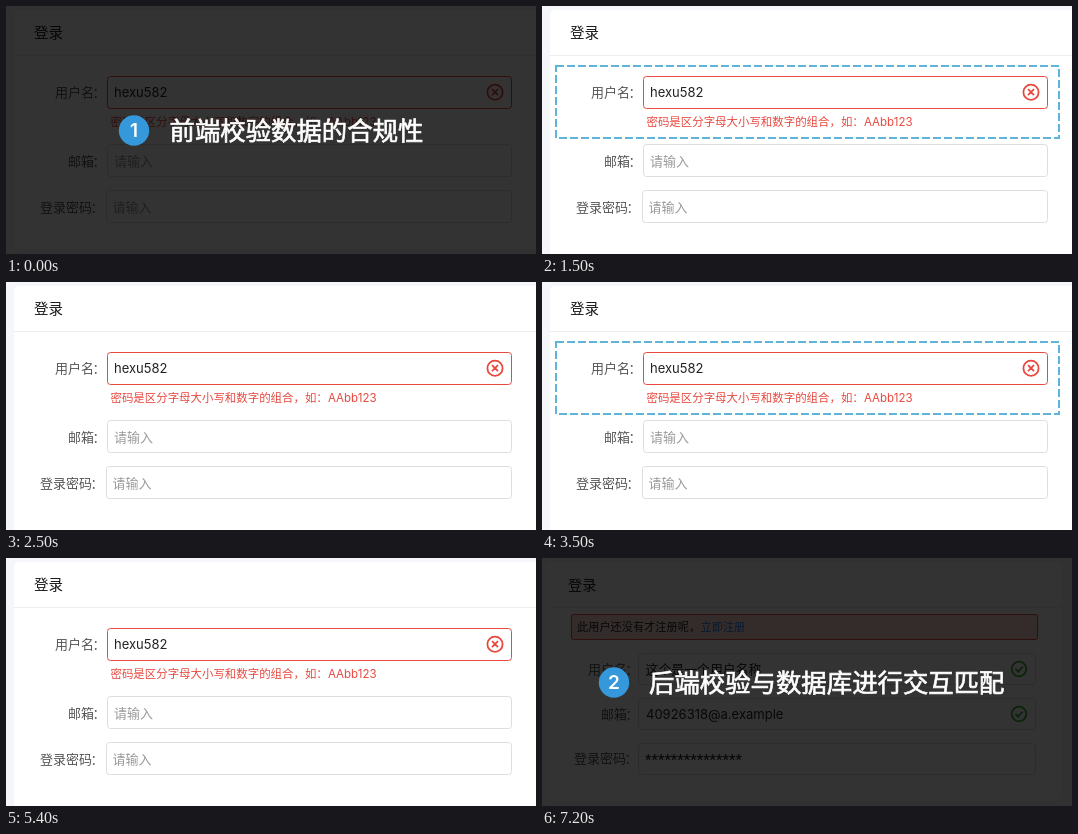
Animation, 530 px wide and 248 px high, one loop 8 s. Source, as an HTML page with a canvas:

```html
<!DOCTYPE html>
<html lang="zh-CN">
<head>
<meta charset="utf-8">
<title>表单校验</title>
<style>
html, body { margin: 0; width: 100%; height: 100%; overflow: hidden; background: #fff; }
canvas { display: block; width: 530px; height: 248px; }
</style>
</head>
<body>
<canvas id="stage"></canvas>
<script>
const W = 530, H = 248, LOOP = 8000;
const canvas = document.getElementById('stage');
const ctx = canvas.getContext('2d');
const scale = Math.max(1, window.devicePixelRatio || 1);
canvas.width = W * scale;
canvas.height = H * scale;

const CJK = '"Noto Sans CJK SC", "Noto Sans CJK", sans-serif';
const LATIN = 'Inter, sans-serif';
const MONO_STARS = 'Roboto, sans-serif';

const color = {
  page: '#f5f6fa', card: '#fff', rule: '#ededed', border: '#dedede',
  title: '#1c1c1c', label: '#555', value: '#222', hint: '#9a9a9a',
  red: '#e8493f', green: '#3cb034', blue: '#1f7fe8', alert: '#ffdcda'
};

// cy is the vertical centre of the glyphs
function text(str, x, cy, size, fill, family = CJK, weight = 400) {
  ctx.font = `${weight} ${size}px ${family}`;
  ctx.fillStyle = fill;
  ctx.fillText(str, x, cy + size * 0.37);
}

function box(x, y, w, h, stroke, fill, r = 3) {
  ctx.beginPath();
  ctx.roundRect(x + 0.5, y + 0.5, w, h, r);
  if (fill) { ctx.fillStyle = fill; ctx.fill(); }
  ctx.strokeStyle = stroke;
  ctx.lineWidth = 1;
  ctx.stroke();
}

function ring(x, y, r, stroke, marks) {
  ctx.strokeStyle = stroke;
  ctx.lineWidth = 1.8;
  ctx.beginPath();
  ctx.arc(x, y, r, 0, Math.PI * 2);
  for (const line of marks) {
    line.forEach(([dx, dy], i) => ctx[i ? 'lineTo' : 'moveTo'](x + dx, y + dy));
  }
  ctx.stroke();
}

const cross = (x, y) =>
  ring(x, y, 7.6, color.red, [[[-3, -3], [3, 3]], [[3, -3], [-3, 3]]]);
const check = (x, y) =>
  ring(x, y, 7.3, color.green, [[[-3.5, 0], [-0.8, 2.7], [3.7, -2.3]]]);

function panel(x, y, right, bottom) {
  ctx.fillStyle = color.page;
  ctx.fillRect(0, 0, W, H);
  ctx.fillStyle = color.card;
  ctx.beginPath();
  ctx.roundRect(x, y, right - x, bottom - y, 5);
  ctx.fill();
  ctx.fillStyle = color.rule;
  ctx.fillRect(x, 49, right - x, 1);
}

function labels(xs, rows) {
  ['用户名', '邮箱', '登录密码'].forEach((name, i) => {
    text(name, xs[i], rows[i], 13, color.label);
    text('：', xs[i] + 13 * name.length - 1.5, rows[i], 13, color.label);
  });
}

function invalidForm(bottom) {
  panel(8, 4, W + 10, bottom);
  text('登录', 28, 27, 14.5, color.title);
  labels([49, 62, 34], [86, 155, 201]);
  box(101, 70, 404, 32, color.red);
  box(101, 138, 404, 32, color.border);
  box(100, 184, 405, 32, color.border);
  text('hexu582', 108, 86, 13, color.value, LATIN);
  cross(489, 86.2);
  text('密码是区分字母大小写和数字的组合，如：', 104.5, 116, 11.45, color.red);
  text('AAbb123', 322, 116, 11.5, color.red, LATIN);
  text('请输入', 108, 155, 13, color.hint);
  text('请输入', 106.5, 201, 13, color.hint);
}

function unknownUserForm() {
  panel(6, 4, 519, 243);
  text('登录', 26, 27, 14.2, color.title);
  box(29, 56, 466, 25, color.red, color.alert, 2);
  text('此用户还没有才注册呢，', 35, 69, 11.2, color.value);
  text('立即注册', 158.5, 69, 11.2, color.blue);
  labels([46, 59, 32], [111, 156, 200.5]);
  for (const y of [95, 140, 185]) box(96, y, 397, 31, color.border);
  text('这个是一个用户名称', 103.5, 111, 12.9, color.value);
  text('40926318@a.example', 104, 156, 13, color.value, LATIN);
  text('*'.repeat(15), 103, 201.5, 15, color.value, MONO_STARS);
  check(477, 111);
  check(477, 156);
}

function shade() {
  ctx.fillStyle = 'rgba(0, 0, 0, 0.8)';
  ctx.fillRect(0, 0, W, H);
}

function caption(num, title, cx, textX) {
  const cy = 124.5, size = 25.4;
  ctx.fillStyle = '#3498db';
  ctx.beginPath();
  ctx.arc(cx, cy, 15.2, 0, Math.PI * 2);
  ctx.fill();
  ctx.textAlign = 'center';
  text(num, cx, cy - 0.5, 19, '#fff', LATIN, 600);
  ctx.textAlign = 'left';
  text(title, textX, cy, size, '#fff');
  // a thin outline gives the medium weight
  ctx.strokeStyle = '#fff';
  ctx.lineWidth = 0.7;
  ctx.strokeText(title, textX, cy + size * 0.37);
}

function highlight() {
  ctx.strokeStyle = '#5fb4dc';
  ctx.lineWidth = 2;
  ctx.setLineDash([8, 3]);
  ctx.strokeRect(14, 60, 503, 72);
  ctx.setLineDash([]);
}

function draw(t) {
  ctx.setTransform(scale, 0, 0, scale, 0, 0);
  if (t < 500) {
    invalidForm(243);
    shade();
    caption('1', '前端校验数据的合规性', 128, 163.5);
  } else if (t < 6000) {
    invalidForm(H + 10);
    const blink = Math.floor((t - 500) / 1000);
    if (blink === 1 || blink === 3) highlight();
  } else {
    unknownUserForm();
    shade();
    caption('2', '后端校验与数据库进行交互匹配', 72, 107);
  }
}

const start = performance.now();
function tick() {
  draw((performance.now() - start) % LOOP);
  requestAnimationFrame(tick);
}
tick();
</script>
</body>
</html>
```
